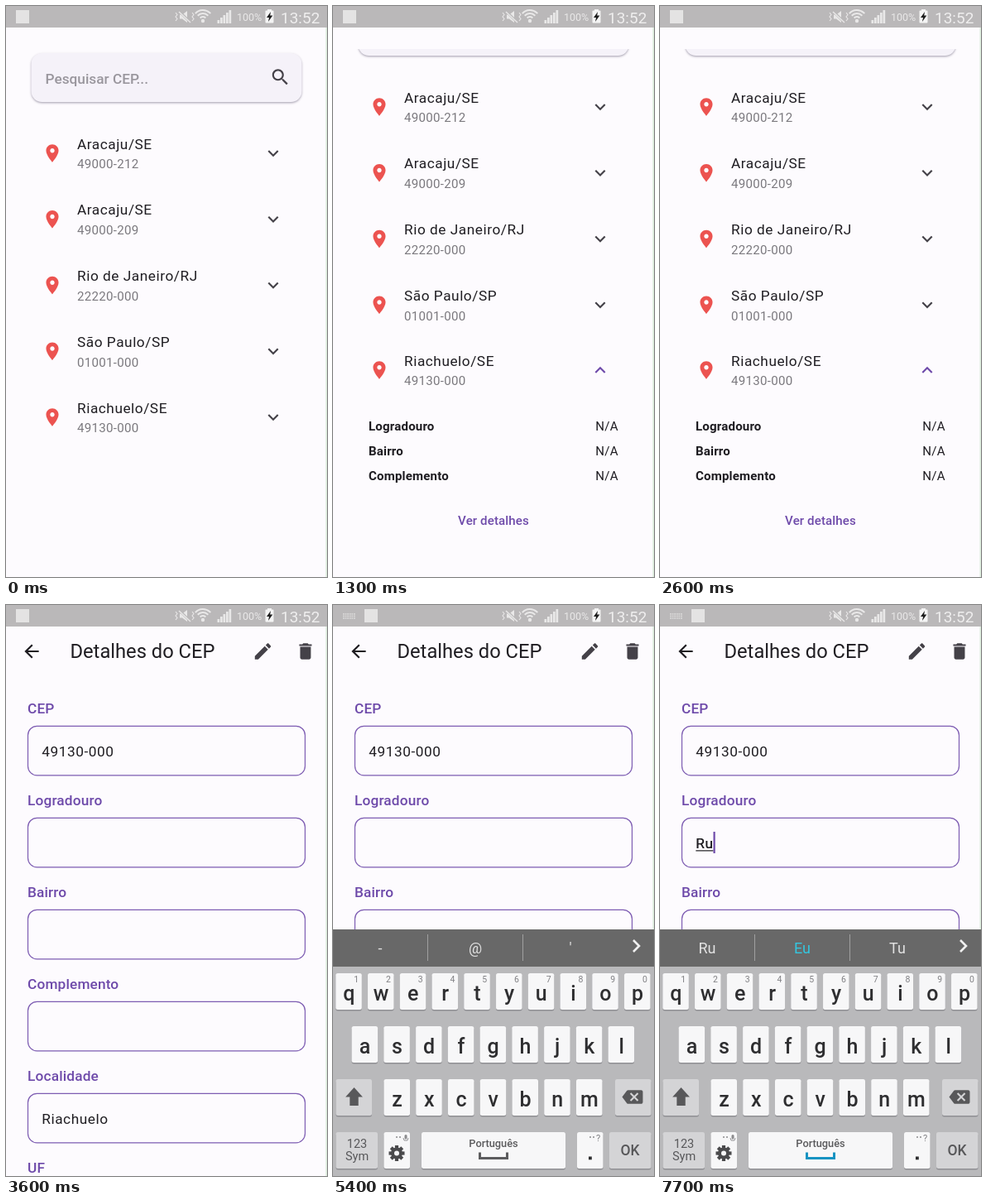
Write an HTML page with a canvas that moves like this. It is 388 by 690 pixels and loops after 8 s.

```html
<!DOCTYPE html>
<html lang="pt">
<head>
<meta charset="utf-8">
<title>Pesquisar CEP</title>
<style>
html, body { margin: 0; width: 100%; height: 100%; overflow: hidden; background: #fdfbfe; }
canvas { display: block; width: 388px; height: 690px; }
</style>
</head>
<body>
<canvas id="stage"></canvas>
<script>
const W = 388, H = 690, LOOP = 8000, DP = W / 360;
const canvas = document.getElementById('stage');
const ctx = canvas.getContext('2d');
const ratio = window.devicePixelRatio || 1;
canvas.width = W * ratio;
canvas.height = H * ratio;

const BG = '#fdfbfe', INK = '#1f1d22', GREY = '#7b797e', DARK = '#444148', PURPLE = '#6e4aaa';

const icons = {
  search: 'M15.5 14h-.79l-.28-.27C15.41 12.59 16 11.11 16 9.5 16 5.91 13.09 3 9.5 3S3 5.91 3 9.5 5.91 16 9.5 16c1.61 0 3.09-.59 4.23-1.57l.27.28v.79l5 4.99L20.49 19l-4.99-5zm-6 0C7.01 14 5 11.99 5 9.5S7.01 5 9.5 5 14 7.01 14 9.5 11.99 14 9.5 14z',
  place: 'M12 2C8.13 2 5 5.13 5 9c0 5.25 7 13 7 13s7-7.75 7-13c0-3.87-3.13-7-7-7zm0 9.5c-1.38 0-2.5-1.12-2.5-2.5s1.12-2.5 2.5-2.5 2.5 1.12 2.5 2.5-1.12 2.5-2.5 2.5z',
  more: 'M16.59 8.59L12 13.17 7.41 8.59 6 10l6 6 6-6z',
  edit: 'M3 17.25V21h3.75L17.81 9.94l-3.75-3.75L3 17.25zM20.71 7.04c.39-.39.39-1.02 0-1.41l-2.34-2.34c-.39-.39-1.02-.39-1.41 0l-1.83 1.83 3.75 3.75 1.83-1.83z',
  trash: 'M6 19c0 1.1.9 2 2 2h8c1.1 0 2-.9 2-2V7H6v12zM19 4h-3.5l-1-1h-5l-1 1H5v2h14V4z',
  back: 'M20 11H7.83l5.59-5.59L12 4l-8 8 8 8 1.41-1.41L7.83 13H20v-2z',
  erase: 'M22 4H7c-.69 0-1.23.35-1.59.88L0 12l5.41 7.11c.36.53.9.89 1.59.89h15c1.1 0 2-.9 2-2V6c0-1.1-.9-2-2-2zm-3 11.59L17.59 17 14 13.41 10.41 17 9 15.59 12.59 12 9 8.41 10.41 7 14 10.59 17.59 7 19 8.41 15.41 12 19 15.59z',
  shift: 'M12 1L2 12h5v10h10V12h5z'
};
for (const k in icons) icons[k] = new Path2D(icons[k]);

const clamp = v => Math.min(1, Math.max(0, v));
const ramp = (t, a, b) => clamp((t - a) / (b - a));
const easeOut = (p, n = 3) => 1 - Math.pow(1 - p, n);
const easeInOut = p => p * p * (3 - 2 * p);

function icon(name, x, y, color, size = 24 * DP, turn = 0) {
  ctx.save();
  ctx.translate(x, y);
  ctx.rotate(turn);
  ctx.scale(size / 24, size / 24);
  ctx.translate(-12, -12);
  ctx.fillStyle = color;
  ctx.fill(icons[name]);
  ctx.restore();
}

function text(s, x, y, size, color, { weight = 400, gap = 0, align = 'left' } = {}) {
  ctx.font = `${weight} ${size}px Roboto, sans-serif`;
  ctx.letterSpacing = gap * DP + 'px';
  ctx.textAlign = align;
  ctx.fillStyle = color;
  ctx.fillText(s, x, y);
}

function rect(x, y, w, h, color) {
  ctx.fillStyle = color;
  ctx.fillRect(x, y, w, h);
}

function box(x, y, w, h, r) {
  ctx.beginPath();
  ctx.roundRect(x, y, w, h, r);
}

function line(points, color, width) {
  ctx.beginPath();
  points.forEach(([x, y]) => ctx.lineTo(x, y));
  ctx.strokeStyle = color;
  ctx.lineWidth = width;
  ctx.stroke();
}

function dot(x, y, r, color) {
  ctx.beginPath();
  ctx.arc(x, y, r, 0, 7);
  ctx.fillStyle = color;
  ctx.fill();
}

// Status bar

function statusBar(t) {
  const pale = '#e9e8e8';
  const typing = t >= 5200;
  rect(0, 0, W, 26, '#bab8b9');
  rect(typing ? 38 : 12, 5, 16, 16, '#e4e3e3');
  if (typing) {
    for (let r = 0; r < 3; r++)
      for (let c = 0; c < 6; c++) rect(12 + c * 2.6, 10 + r * 2.6, 1.8, 1.7, '#d9d8d8');
  }

  line([[205, 8], [207, 10.5], [205, 13], [207, 15.5], [205, 18]], pale, 1.1);
  line([[225, 8], [227, 10.5], [225, 13], [227, 15.5], [225, 18]], pale, 1.1);
  ctx.beginPath();
  [[210, 10.5], [213, 10.5], [219, 6], [219, 20], [213, 15.5], [210, 15.5]].forEach(p => ctx.lineTo(...p));
  ctx.fillStyle = pale;
  ctx.fill();
  line([[209, 6], [223, 20]], '#bab8b9', 3);
  line([[209, 7], [223, 20]], pale, 1.4);

  for (const r of [4.5, 8.5, 12.5]) {
    ctx.beginPath();
    ctx.arc(238, 17.5, r, -2.4, -0.74);
    ctx.strokeStyle = pale;
    ctx.lineWidth = 2;
    ctx.stroke();
  }
  dot(238, 18, 2.2, pale);

  for (let i = 0; i < 5; i++) rect(255.5 + i * 3.5, 17 - i * 3, 2.7, 4 + i * 3, pale);
  text('100%', 279, 18, 12.5, pale);
  rect(316, 4, 5, 2, '#f4f4f4');
  box(313.5, 5.5, 10, 15, 1);
  ctx.fillStyle = '#f4f4f4';
  ctx.fill();
  ctx.beginPath();
  [[320, 7], [315, 14], [318, 14], [317, 19], [322.3, 11.5], [319.2, 11.5]].forEach(p => ctx.lineTo(...p));
  ctx.fillStyle = '#1c1c1c';
  ctx.fill();
  text('13:52', 332, 20.8, 19, '#efeeee');
}

// Search list

const places = [
  ['Aracaju/SE', '49000-212'],
  ['Aracaju/SE', '49000-209'],
  ['Rio de Janeiro/RJ', '22220-000'],
  ['São Paulo/SP', '01001-000'],
  ['Riachuelo/SE', '49130-000']
];

function searchCard() {
  ctx.save();
  ctx.shadowColor = 'rgba(60,50,80,.42)';
  ctx.shadowBlur = 2.5 * ratio;
  ctx.shadowOffsetY = 1.2 * ratio;
  box(30.5, 57, 327, 59, 13);
  ctx.fillStyle = '#f5f2f9';
  ctx.fill();
  ctx.restore();
  text('Pesquisar CEP...', 47.5, 93.5, 16 * DP, '#99969d', { weight: 500 });
  icon('search', 331.5, 86, DARK);
}

function placeRow([city, code], y, open) {
  icon('place', 56, y, '#ec5350');
  text(city, 86, y - 5.4, 16 * DP, INK, { gap: .5 });
  text(code, 86, y + 18.3, 14 * DP, GREY, { gap: .25 });
  icon('more', 323, y, open > .5 ? PURPLE : DARK, 24 * DP, open * Math.PI);
}

function tileBody(open) {
  const top = 536, full = 165, shown = full * open;
  ctx.save();
  ctx.beginPath();
  ctx.rect(0, top, W, shown);
  ctx.clip();
  ctx.translate(0, (shown - full) / 2);
  ['Logradouro', 'Bairro', 'Complemento'].forEach((name, i) => {
    const y = 568.6 + i * 30.2;
    text(name, 43, y, 14 * DP, INK, { weight: 700, gap: .15 });
    text('N/A', 344.8, y, 14 * DP, INK, { gap: .25, align: 'right' });
  });
  text('Ver detalhes', 194, 682.8, 14 * DP, PURPLE, { weight: 500, gap: .1, align: 'center' });
  ctx.restore();
}

function listPage(t) {
  const open = easeInOut(ramp(t, 200, 500));
  const scroll = 56 * easeOut(ramp(t, 1130, 1300), 5);
  const pull = easeOut(ramp(t, 1300, 1700), 2) * (1 - easeInOut(ramp(t, 1770, 2300)));
  const stretch = 1 + .0102 * pull;
  const glow = ramp(t, 0, 300) * (1 - ramp(t, 400, 800));

  ctx.save();
  ctx.beginPath();
  ctx.rect(26, 52, 336, 612);
  ctx.clip();
  ctx.translate(0, 664);
  ctx.scale(1, stretch);
  ctx.translate(0, -664 - scroll);
  if (glow > 0) rect(26, 457, 336, 79, `rgba(60,50,80,${.08 * glow})`);
  searchCard();
  places.forEach((p, i) => {
    const last = i === places.length - 1;
    placeRow(p, 178 + i * 79.75 - (last ? open : 0), last ? open : 0);
  });
  if (open > 0) tileBody(open);
  ctx.restore();
}

// Details form

function detailsPage(t) {
  const typed = t >= 7600 ? 'Ru' : t >= 6800 ? 'R' : '';
  const values = ['49130-000', typed, '', '', 'Riachuelo', ''];
  icon('back', 31, 56, INK);
  text('Detalhes do CEP', 77.5, 64, 22 * DP, INK);
  icon('edit', 310.5, 56, DARK);
  icon('trash', 362, 56, DARK);

  ['CEP', 'Logradouro', 'Bairro', 'Complemento', 'Localidade', 'UF'].forEach((label, i) => {
    const y = i * 111;
    text(label, 26, 131 + y, 16 * DP, PURPLE, { weight: 500, gap: .15 });
    box(26.5, 146.3 + y, 335, 59.5, 11);
    ctx.strokeStyle = '#7d5cb2';
    ctx.lineWidth = 1.2;
    ctx.stroke();
    text(values[i], 43.3, 183 + y, 16 * DP, INK, { gap: .5 });
  });

  text(typed, 43.3, 294, 16 * DP, INK, { gap: .5 });
  const end = 43.3 + ctx.measureText(typed).width;
  if (typed) rect(43.3, 296.3, end - 43.3, 1.2, INK);
  const blink = [[4700, 5400], [5700, 6200], [6800, 7400], [7600, LOOP]];
  if (blink.some(([a, b]) => t >= a && t < b)) rect(end, 274, 2.2, 26, PURPLE);
}

// Keyboard

const PITCH = 38.75, KEY = '#f7f7f8', SIDE = '#d4d4d6', GLYPH = '#2e2e30';

function key(x, y, w, color = KEY) {
  box(x, y + 1.5, w, 44, 2.5);
  ctx.fillStyle = '#909094';
  ctx.fill();
  box(x, y, w, 44, 2.5);
  ctx.fillStyle = color;
  ctx.fill();
}

function gear(x, y) {
  ctx.save();
  ctx.translate(x, y);
  ctx.fillStyle = '#4a4a4c';
  for (let i = 0; i < 8; i++) {
    ctx.fillRect(-2.1, -9.5, 4.2, 5);
    ctx.rotate(Math.PI / 4);
  }
  ctx.restore();
  dot(x, y, 7, '#4a4a4c');
  dot(x, y, 3, KEY);
}

function letters(row, x0, y, caps, pressed) {
  [...row].forEach((ch, i) => {
    const x = x0 + i * PITCH;
    key(x - 16, y, 31.5, ch === pressed ? '#c9dfe8' : KEY);
    text(caps ? ch.toUpperCase() : ch, x, y + 32.5, 25, GLYPH, { weight: 500, align: 'center' });
    if (row.length === 10) text((i + 1) % 10, x + 9, y + 11, 10.5, '#808084', { align: 'center' });
  });
}

function preview(ch, x) {
  ctx.save();
  ctx.shadowColor = 'rgba(0,0,0,.4)';
  ctx.shadowBlur = 3 * ratio;
  box(x - 31, 376, 62, 64, 3);
  ctx.fillStyle = '#fafafa';
  ctx.fill();
  ctx.restore();
  text(ch, x, 421, 36, GLYPH, { align: 'center' });
}

function suggestions(t) {
  const words = t >= 7700 ? ['Ru', 'Eu', 'Tu'] : t >= 6900 ? ['R', 'E', 'T'] : ['-', '@', "'"];
  rect(0, 392, W, 45, '#686868');
  words.forEach((w, i) => {
    const color = i === 1 && t >= 6900 ? '#34c6df' : '#e2e2e2';
    text(w, 57 + i * 115, 421, 18, color, { align: 'center' });
  });
  rect(114, 398, 1, 32, '#a0a0a0');
  rect(229, 398, 1, 32, '#a0a0a0');
  line([[363, 405], [370, 412], [363, 419]], '#f0f0f0', 2.6);
}

function keyboard(t) {
  const caps = t >= 6100 && t < 6800;
  const pressed = t >= 6700 && t < 6900 ? 'r' : t >= 7400 && t < 7600 ? 'u' : '';
  const center = { align: 'center' };
  rect(0, 437, W, 253, '#b9b9bb');
  suggestions(t);
  letters('qwertyuiop', 19.3, 445, caps, pressed);
  letters('asdfghjkl', 38.6, 509, caps, pressed);
  letters('zxcvbnm', 77.5, 573, caps, pressed);

  key(3.5, 573, 43.5, SIDE);
  icon('shift', 25.5, 594.5, caps ? '#169ad0' : '#58585a', 25);
  key(341, 573, 43.5, SIDE);
  icon('erase', 362, 594.5, '#58585a', 25);

  key(3.5, 637, 50.5, SIDE);
  text('123', 29, 656, 14.5, '#58585a', center);
  text('Sym', 29, 671, 14.5, '#58585a', center);
  key(61.5, 637, 31.5);
  gear(77, 662.5);
  dot(77, 643, 1, '#8a8a8c');
  dot(81, 643, 1, '#8a8a8c');
  box(86.5, 640, 3, 5.5, 1.5);
  ctx.fillStyle = '#8a8a8c';
  ctx.fill();
  line([[85, 644], [86, 647], [90, 647], [91, 644]], '#8a8a8c', .9);
  key(107, 637, 174);
  text('Português', 194, 654.8, 12.8, '#5a5a5c', { weight: 500, align: 'center' });
  line([[177.5, 661.5], [177.5, 668.5], [210.5, 668.5], [210.5, 661.5]], t >= 6900 ? '#1793c2' : '#5c5c5e', 3);
  key(295, 637, 31.5);
  rect(309, 666.5, 3.8, 3.8, GLYPH);
  dot(311, 643, 1, '#8a8a8c');
  dot(315, 643, 1, '#8a8a8c');
  text('?', 320.5, 648, 11, '#808084', center);
  key(334, 637, 50.5, SIDE);
  text('OK', 359, 665, 17.5, '#58585a', { weight: 500, align: 'center' });

  if (pressed === 'r') preview(caps ? 'R' : 'r', 135.5);
  if (pressed === 'u') preview('u', 252);
}

function draw(t) {
  ctx.setTransform(ratio, 0, 0, ratio, 0, 0);
  rect(0, 0, W, H, BG);
  if (t < 3600) listPage(t);
  else detailsPage(t);
  rect(386.5, 26, 1.5, H - 26, '#dcecdc');
  if (t >= 5400) keyboard(t);
  statusBar(t);
}

const start = performance.now();
function tick() {
  const t = (performance.now() - start) % LOOP;
  draw(Math.floor(t / 100) * 100);
  requestAnimationFrame(tick);
}
tick();
</script>
</body>
</html>
```
